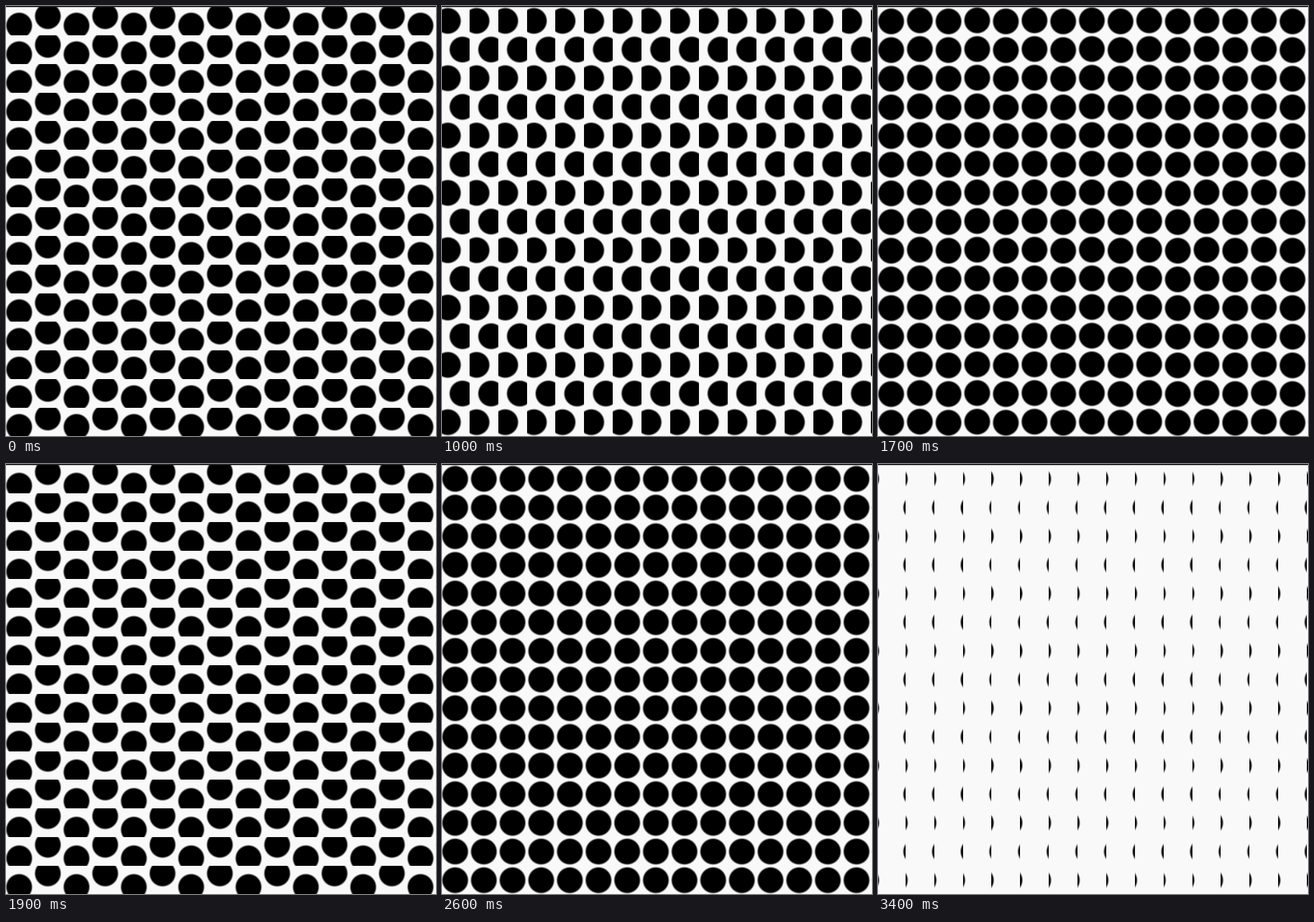
Recreate the animation shown at these times as an HTML page with a canvas. Size 748 px wide and 748 px high, loop 3.5 s.

```html
<!DOCTYPE html>
<html>
<head>
<meta charset="utf-8">
<title>Sliding dots</title>
<style>
  html, body { margin: 0; width: 100%; height: 100%; overflow: hidden; background: #f9f9f9; }
  canvas { display: block; width: 100vw; height: 100vh; }
</style>
</head>
<body>
<canvas id="stage" width="748" height="748"></canvas>
<script>
const SIZE = 748, CELL = SIZE / 15, LEFT = -2, TOP = 0.95;
const LOOP = 3500, STEP = 100;
const PHASE = 0.163, RATE = 0.10912; // cells travelled: at the start, per step
const ctx = document.getElementById('stage').getContext('2d');

// Soft-edged dot, to be painted through the window of one cell
function dot(x, y) {
  const g = ctx.createRadialGradient(x, y, 0, x, y, 23.8);
  g.addColorStop(0, '#000');
  g.addColorStop(20.8 / 23.8, '#000');
  g.addColorStop(1, '#0000');
  return g;
}

function draw(time) {
  const phase = PHASE + RATE * Math.floor(time % LOOP / STEP);
  const shift = phase % 1 * CELL;
  const vertical = Math.floor(phase) % 2 === 0;

  ctx.fillStyle = '#f9f9f9';
  ctx.fillRect(0, 0, SIZE, SIZE);
  for (let row = 0; row < 15; row++) {
    for (let col = 0; col < 16; col++) {
      const x = LEFT + col * CELL, y = TOP + row * CELL;
      const dx = vertical ? 0 : row % 2 ? shift : -shift;
      const dy = !vertical ? 0 : col % 2 ? -shift : shift;
      const x0 = Math.round(x), y0 = Math.round(y);
      ctx.fillStyle = dot(x + CELL / 2 + dx, y + CELL / 2 + dy);
      ctx.fillRect(x0, y0, Math.round(x + CELL) - x0, Math.round(y + CELL) - y0);
    }
  }
  ctx.fillStyle = '#222';
  ctx.fillRect(0, 0, SIZE, 2);
}

const start = performance.now();
function tick() {
  draw(performance.now() - start);
  requestAnimationFrame(tick);
}
tick();
</script>
</body>
</html>
```
